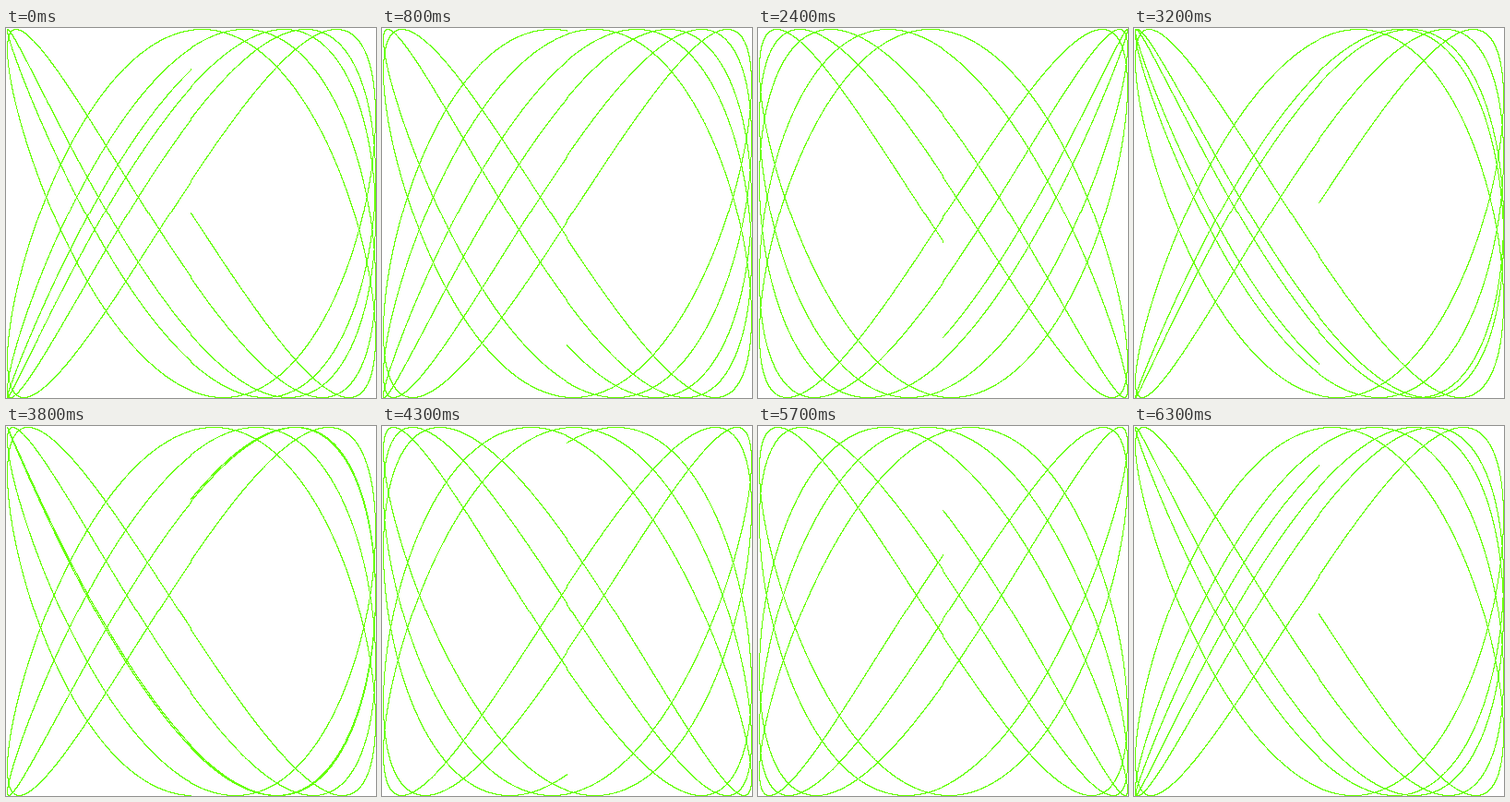
Animation of 401 by 401 pixels, one loop 6400 ms. Source, as an HTML page with a canvas:

```html
<!DOCTYPE html>
<html>
<head>
<meta charset="utf-8">
<title>Lissajous</title>
<style>
  html, body { margin: 0; width: 100%; height: 100%; overflow: hidden; background: #fff; }
  canvas { display: block; }
</style>
</head>
<body>
<canvas width="401" height="401"></canvas>
<script>
const RADIUS = 200, SIDE = 2 * RADIUS + 1;
const CYCLES = 5, STEP = 0.001, FREQ = 1.5287;
const STEPS = 64, STEP_MS = 100, PHASE_STEP = 0.1;
const WHITE = 0xffffffff, GREEN = 0xff00ff66; // ABGR

const ctx = document.querySelector('canvas').getContext('2d');
const image = ctx.createImageData(SIDE, SIDE);
const pixels = new Uint32Array(image.data.buffer);

// Truncates toward zero, which leaves a small jog at the centre lines.
const toPixel = v => RADIUS + Math.trunc(v * RADIUS + 0.5);

function draw(phase) {
  pixels.fill(WHITE);
  for (let t = 0; t < CYCLES * 2 * Math.PI; t += STEP) {
    const x = toPixel(Math.sin(t));
    const y = toPixel(Math.sin(t * FREQ + phase));
    pixels[y * SIDE + x] = GREEN;
  }
  ctx.putImageData(image, 0, 0);
}

let start, shown = -1;
function tick(now) {
  start ??= now;
  const step = Math.floor((now - start) / STEP_MS) % STEPS;
  if (step !== shown) draw(step * PHASE_STEP);
  shown = step;
  requestAnimationFrame(tick);
}
requestAnimationFrame(tick);
</script>
</body>
</html>
```
